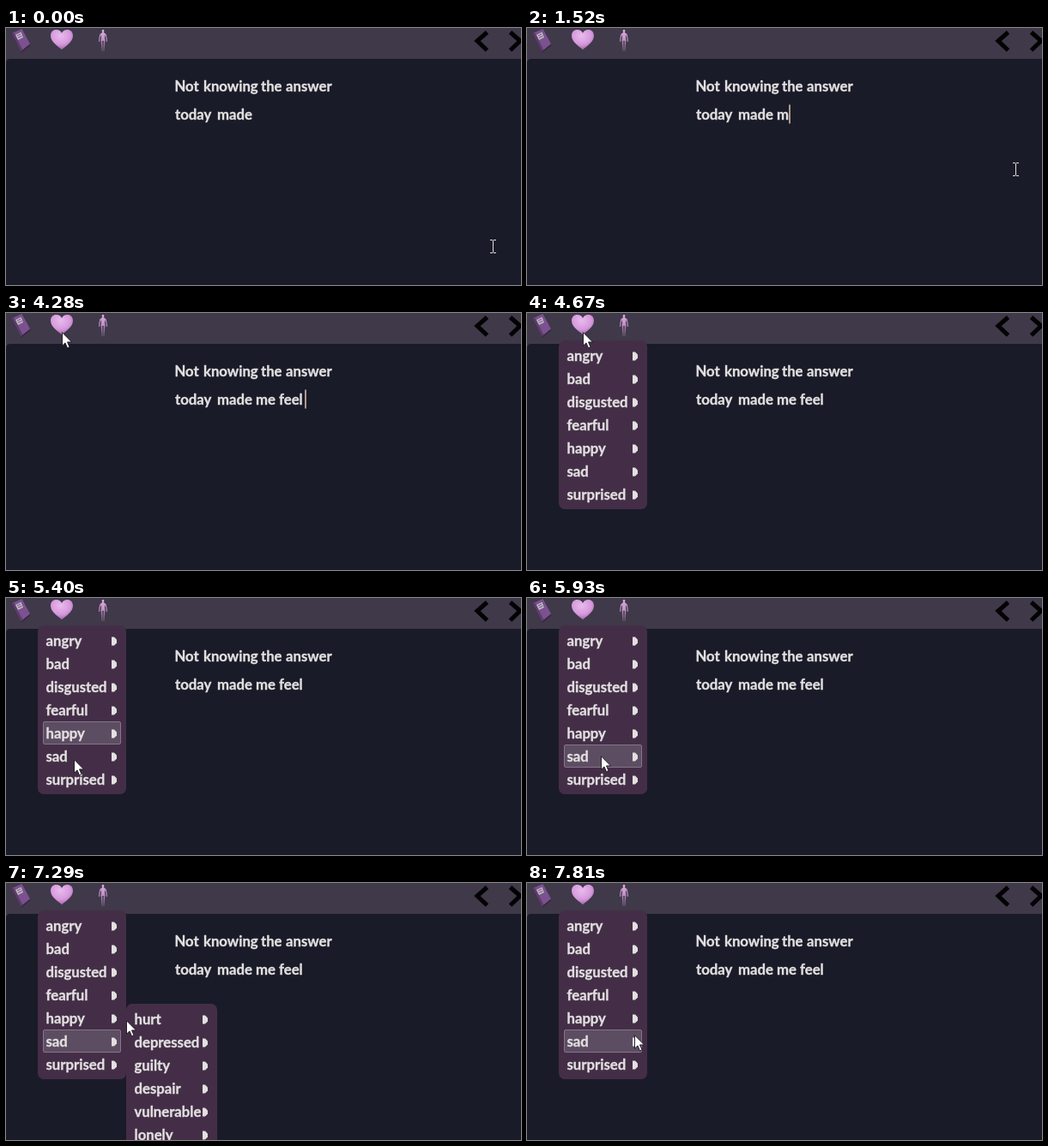
An HTML page that plays this animation: 600 by 300 pixels, repeating every 8 s.

```html
<!DOCTYPE html>
<html lang="en">
<head>
<meta charset="utf-8">
<title>Mood journal</title>
<style>
  html, body { margin: 0; width: 100%; height: 100%; overflow: hidden; background: #1a1b28; }
  svg { display: block; width: 100vw; height: 100vh; }
  text { font: 700 16.7px Lato, "Open Sans", sans-serif; fill: #e2e0e0; stroke: #e2e0e0; stroke-width: .35; }
</style>
</head>
<body>
<svg viewBox="0 0 600 300">
  <defs>
    <radialGradient id="pink" cx=".45" cy=".3" r=".72">
      <stop offset="0" stop-color="#e9bbed"/>
      <stop offset=".6" stop-color="#d699dc"/>
      <stop offset="1" stop-color="#9c62a6"/>
    </radialGradient>
    <linearGradient id="skin" gradientUnits="userSpaceOnUse" x1="0" y1="2" x2="0" y2="27">
      <stop offset="0" stop-color="#dfacdf"/>
      <stop offset=".45" stop-color="#c191c6"/>
      <stop offset="1" stop-color="#5d4a66"/>
    </linearGradient>
  </defs>

  <rect width="600" height="300" fill="#3f394a"/>
  <path d="M0 300V41Q0 36 5 36H600V300Z" fill="#1a1b28"/>

  <g id="book">
    <path d="M6.500 7L10 5L20 25L28 18.500V20.500L18 28.500Z" fill="#39243f"/>
    <path d="M7 6L18.500 1L28 18.500L17.500 27Z" fill="#7b5190"/>
    <path d="M6.500 6.500L9 5.300L19.500 25.500L17.500 27.500Z" fill="#5c3c6a"/>
    <path d="M11 8L17.500 4.800L20 11L14 14Z" fill="#c3b6c8"/>
    <path d="M13 9L17 7.200M14 11.300L18.500 9.300" stroke="#66496f" stroke-width=".9"/>
  </g>
  <path d="M65 25.300C61 21.500 52 16.500 52 9C52 4.500 55 2 58.500 2C61.500 2 64 3.500 65 6C66 3.500 68.500 2 71.500 2C75 2 78 4.500 78 9C78 16.500 69 21.500 65 25.300Z" fill="url(#pink)"/>
  <g id="person" fill="url(#skin)" stroke="url(#skin)">
    <ellipse cx="113" cy="3.500" rx="1.300" ry="1.800" stroke="none"/>
    <path d="M112.300 5H113.700L116 6.800L115 11L115.500 15H110.500L111 11L110 6.800Z" stroke="none"/>
    <path d="M110 7L109 11.500L108.500 16M116 7L117 11.500L117.500 16" fill="none" stroke-width="1.100"/>
    <path d="M111.400 14L111.700 20L112 27.300M114.600 14L114.300 20L114 27.300" fill="none" stroke-width="1.500"/>
  </g>
  <g fill="none" stroke="#020203" stroke-width="5">
    <path d="M560.500 5L549 15L560.500 26"/>
    <path d="M587.500 5L599 15L587.500 26"/>
  </g>

  <g id="lines"></g>
  <rect id="caret" y="89.500" width="2" height="22" fill="#ab9a8e"/>
  <g id="menus"></g>

  <path id="beam" d="M-3 -7.500H0M1 -7.500H4M.5 -7V7M-3 7.500H0M1 7.500H4" fill="none" stroke="#dedee0"/>
  <path id="arrow" d="M.5 .8V16.200L4 12.900L6.500 18.800L9 17.700L6.500 11.900H11.500Z" fill="#fff" stroke="#17131b" stroke-width=".9"/>
</svg>
<script>
const LOOP = 8000, ROW = 27, PAD = 4, SAD = 5;
const CARET_ON = 380, MENU_OPEN = 4530, SUB_OPEN = 6170, SUB_CLOSE = 7670;
const STEP = 125, HOVER_LAG = 100;

const home = [567, 255];
const moves = [
  { from: 0, to: 230, end: [573, 170] },
  { from: 380, to: 680, end: [569, 165] },
  { from: 3400, to: 3780, end: [216, 102] },
  { from: 3780, to: 4280, end: [65, 22] },
  { from: 5120, to: 5400, end: [79, 188] },
  { from: 5400, to: 5530, end: [84, 204] },
  { from: 5650, to: 5930, end: [86, 184] },
  { from: 7050, to: 7290, end: [140, 160] },
  { from: 7290, to: 7540, end: [164, 170] },
  { from: 7540, to: 7810, end: [125, 177] }
];
const bursts = [
  { from: 1520, gap: 120, keys: "me f" },
  { from: 2380, gap: 0, keys: "ee" },
  { from: 2760, gap: 620, keys: "l " }
];
const typedX = [291, 318, 348];

const $ = id => document.getElementById(id);
const show = (el, on) => el.setAttribute("visibility", on ? "visible" : "hidden");
const easeOut = f => 1 - (1 - f) ** 3;

function add(parent, tag, attrs, text = "") {
  const el = document.createElementNS("http://www.w3.org/2000/svg", tag);
  for (const name in attrs) el.setAttribute(name, attrs[name]);
  el.textContent = text;
  return parent.appendChild(el);
}

const addWord = (x, y, word) => add($("lines"), "text", { x, y }, word);

// Each move eases out, sampled in a few visible jumps.
function pointerAt(t) {
  let pos = home;
  for (const { from, to, end } of moves) {
    if (t < from) break;
    const jumps = Math.round((to - from) / STEP);
    const f = Math.min(1, (t - from) / (to - from));
    const k = easeOut(Math.floor(f * jumps) / jumps);
    pos = pos.map((v, i) => v + (end[i] - v) * k);
  }
  return pos;
}

function typedAt(t) {
  return bursts.map(({ from, gap, keys }) =>
    [...keys].filter((_, i) => t >= from + i * gap).join("")).join("");
}

function makeMenu(x, y, width, labels) {
  const height = labels.length * ROW + 2 * PAD;
  const group = add($("menus"), "g", { transform: `translate(${x} ${y})` });
  add(group, "rect", { width, height, rx: 7, fill: "#442e47" });
  const mark = add(group, "rect", {
    x: 6.5, width: width - 13, height: ROW - 1, rx: 1.5, fill: "#5d4d62", stroke: "#84758a"
  });
  labels.forEach((label, i) => {
    const top = PAD + i * ROW;
    add(group, "text", { x: 9.5, y: top + 20 }, label);
    add(group, "path", { d: `M${width - 17} ${top + 9.5}h3l3 3v4l-3 3h-3z`, fill: "#e2e0e0" });
  });
  const rowAt = ([px, py]) => {
    const row = Math.floor((py - y - PAD) / ROW);
    return px > x && px < x + width && row < labels.length ? row : -1;
  };
  return { group, mark, rowAt };
}

function drawMenu({ group, mark }, open, row) {
  show(group, open);
  show(mark, open && row >= 0);
  mark.setAttribute("y", PAD + .5 + row * ROW);
}

addWord(196.5, 74, "Not");
addWord(230, 74, "knowing");
addWord(297, 74, "the");
addWord(326, 74, "answer");
addWord(197, 107, "today");
addWord(246, 107, "made");
const typedWords = typedX.map(x => addWord(x, 107, ""));

const main = makeMenu(37, 32, 103,
  ["angry", "bad", "disgusted", "fearful", "happy", "sad", "surprised"]);
const sub = makeMenu(140, 141, 106,
  ["hurt", "depressed", "guilty", "despair", "vulnerable", "lonely"]);

function render(t) {
  const words = typedAt(t).split(" ");
  typedWords.forEach((el, i) => { el.textContent = words[i] || ""; });
  const last = words.length - 1;
  const wordEnd = typedX[last] + typedWords[last].getComputedTextLength();
  $("caret").setAttribute("x", Math.round(wordEnd));
  show($("caret"), t >= CARET_ON && t < MENU_OPEN);

  const menuOpen = t >= MENU_OPEN;
  const subOpen = t >= SUB_OPEN && t < SUB_CLOSE;
  const hover = pointerAt(t - HOVER_LAG);
  drawMenu(main, menuOpen, subOpen ? SAD : main.rowAt(hover));
  drawMenu(sub, subOpen, sub.rowAt(hover));

  const [x, y] = pointerAt(t).map(Math.round);
  const isArrow = menuOpen || y < 36;
  for (const id of ["arrow", "beam"]) {
    $(id).setAttribute("transform", `translate(${x} ${y})`);
    show($(id), isArrow === (id === "arrow"));
  }
}

const start = performance.now();
function tick() {
  render((performance.now() - start) % LOOP);
  requestAnimationFrame(tick);
}
tick();
</script>
</body>
</html>
```
